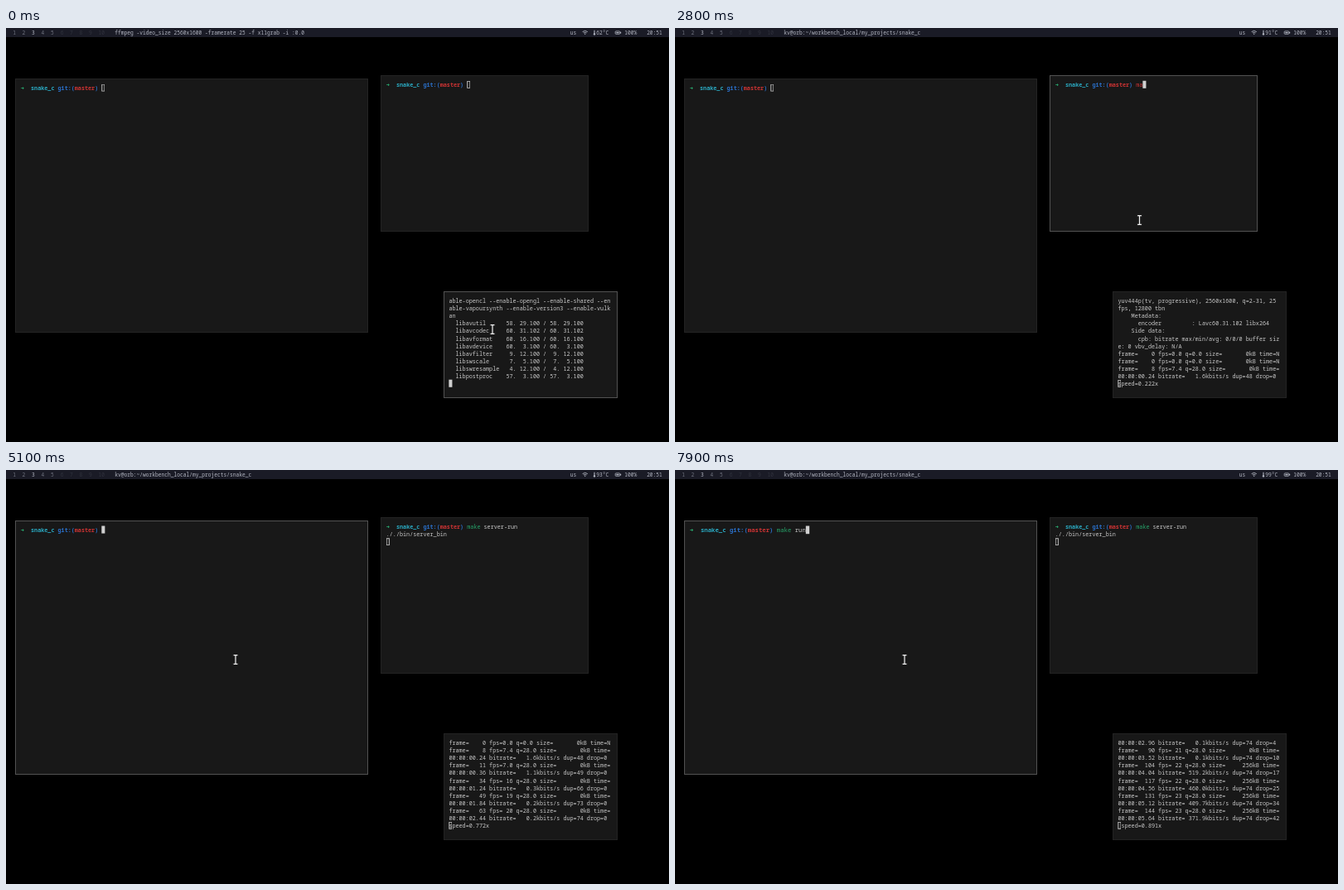
Animation of 800 by 500 pixels, one loop 8000 ms. Source, as an HTML page:

```html
<!DOCTYPE html>
<html lang="en">
<head>
<meta charset="utf-8">
<title>Terminals</title>
<style>
  html, body { margin: 0; width: 100%; height: 100%; overflow: hidden; background: #000; }
  #stage { position: relative; width: 800px; height: 500px; overflow: hidden; background: #000; }
  #bar { position: absolute; width: 800px; height: 11px; background: #1a1b26; }
  .win { position: absolute; box-sizing: border-box; background: #181818; border: 1px solid #232323; }
  .win.on { border-color: #525252; }

  /* Text is laid out on a 2560 x 1600 desktop and shown at 800 x 500. */
  #desk {
    position: absolute; width: 2560px; height: 1600px;
    transform: scale(.3125); transform-origin: 0 0;
    font-family: "Noto Sans Mono", "DejaVu Sans Mono", monospace; color: #c8c8c8;
  }
  #desk pre { position: absolute; margin: 0; font: inherit; font-size: 21.6667px; line-height: 1.34em; }
  #desk .label { position: absolute; top: 0; font-size: 20px; line-height: 35px; color: #b3b6c2; white-space: pre; }
  #desk .label.idle { color: #70737f; }
  #desk .label.empty { color: #30323d; }
  i { display: inline-block; width: .6em; height: 1.34em; vertical-align: top; font-style: normal; }
  .solid { background: #d0d0d0; color: #181818; }
  .hollow { box-shadow: inset 0 0 0 3px #c8c8c8; }
  .green { color: #26a269; }
  .arrow { color: #2bc47e; font-family: "DejaVu Sans Mono", monospace; }
  .cyan { color: #2aa8c0; }
  .blue { color: #2a6fc8; }
  .red { color: #cc3333; }
  .pink { color: #d0405a; }
  .violet { color: #6f68bb; }
  .warn { color: #d6d0ac; }
  svg { position: absolute; left: 0; top: 0; }
</style>
</head>
<body>
<div id="stage">
  <div id="bar"></div>
  <div class="win" id="winLeft" style="left:11px;top:61px;width:426px;height:307px"></div>
  <div class="win" id="winRight" style="left:452px;top:57px;width:251px;height:189px"></div>
  <div class="win" id="winLog" style="left:528px;top:318px;width:210px;height:129px"></div>
  <div id="desk">
    <span class="label" id="title" style="left:420px"></span>
    <span class="label" style="left:2178px">us</span>
    <span class="label" id="temp" style="left:2279px"></span>
    <span class="label" style="left:2388px">100%</span>
    <span class="label" style="left:2474px">20:51</span>
    <pre id="left" style="left:57px;top:216px"></pre>
    <pre id="right" style="left:1468px;top:204px"></pre>
    <pre id="log" style="left:1710px;top:1040px"></pre>
  </div>
  <svg width="800" height="500" fill="none" stroke="#b3b6c2">
    <path d="M695.6 4.6Q698.7 2 701.8 4.6M696.9 6Q698.7 4.5 700.5 6" stroke-width=".9"/>
    <circle cx="698.7" cy="7.3" r=".7" fill="#b3b6c2" stroke="none"/>
    <path d="M710 2.8V7" stroke-width="1.1"/>
    <circle cx="710" cy="7.4" r="1.2" fill="#b3b6c2" stroke="none"/>
    <rect x="735.2" y="3.9" width="5.6" height="3.4" rx=".8" stroke-width=".8"/>
    <path d="M736.4 5.6H739.6M741.6 4.8V6.4" stroke-width="1.2"/>
    <g id="mouse">
      <path id="beam" d="M-2.4-5.3H2.4M0-5.3V5.3M-2.4 5.3H2.4" stroke="#222" stroke-width="2.6" stroke-linecap="square"/>
      <use href="#beam" style="display:none"/>
      <path d="M-2.4-5.3H2.4M0-5.3V5.3M-2.4 5.3H2.4" stroke="#eee" stroke-width="1.2"/>
    </g>
  </svg>
</div>
<script>
const LOOP = 8000, STEP = 100, COLS = 48, ROWS = 12;
const $ = id => document.getElementById(id);
const last = (list, t) => list.filter(e => e[0] <= t).pop();

const SHELL = "kv@orb:~/workbench_local/my_projects/snake_c";
const titles = [
  [0, "ffmpeg -video_size 2560x1600 -framerate 25 -f x11grab -i :0.0"],
  [2400, SHELL], [4000, "make server-run"], [4600, SHELL]
];
const temps = [[0, 62], [700, 63], [1700, 74], [2700, 91], [3700, 92], [4700, 93], [5700, 95], [7700, 99]];
const focus = [[0, "Log"], [2400, "Right"], [4600, "Left"]];
const path = [[0, 587, 364], [1300, 587, 364], [1800, 560.5, 232], [4000, 560.5, 232], [4500, 277, 229], [LOOP, 277, 229]];
const rightTyped = [
  [0, ""], [2700, "m"], [2800, "ma"], [2900, "mak"], [3000, "make"], [3100, "make "],
  [3200, "make r"], [3300, "make ru"], [3400, "make run"], [3700, "make server-run"]
];
const leftTyped = [
  [0, ""], [5300, "m"], [5400, "ma"], [5500, "mak"], [5600, "make"], [5700, "make "],
  [5900, "make r"], [6000, "make ru"], [6200, "make run"]
];
const ENTER = 4000, ZOOM = 7800;

// Each entry takes over from the unfinished last line: [time, text, cursor column].
const idle = `frame=    0 fps=0.0 q=0.0 size=       0kB time=N/A bitrate=N/A dup=38 drop=0 speed=N/A`;
const output = [
  [0, `able-opencl --enable-opengl --enable-shared --enable-vapoursynth --enable-version3 --enable-vulkan
  libavutil      58. 29.100 / 58. 29.100
  libavcodec     60. 31.102 / 60. 31.102
  libavformat    60. 16.100 / 60. 16.100
  libavdevice    60.  3.100 / 60.  3.100
  libavfilter     9. 12.100 /  9. 12.100
  libswscale      7.  5.100 /  7.  5.100
  libswresample   4. 12.100 /  4. 12.100
  libpostproc    57.  3.100 / 57.  3.100
`],
  [1000, `[x11grab @ 0x59b768b765c0] Stream #0: not enough frames to estimate rate; consider increasing probesize
Input #0, x11grab, from ':0.0':
  Duration: N/A, start: 1717955492.213466, bitrate: 3276800 kb/s
  Stream #0:0: Video: rawvideo (BGR[0] / 0x524742), bgr0, 2560x1600, 3276800 kb/s, 25 fps, 1000k tbr, 1000k tbn
File 'screen_capture.mp4' already exists. Overwrite? [y/N] `, 11],
  [1200, `ite? [y/N] y`, 12],
  [1300, `ite? [y/N] y
`],
  [1400, `Stream mapping:
  Stream #0:0 -> #0:0 (rawvideo (native) -> h264 (libx264))
Press [q] to stop, [?] for help
`],
  [1600, `[libx264 @ 0x59b768b8e2c0] using cpu capabilities: MMX2 SSE2Fast SSSE3 SSE4.2 AVX FMA3 BMI2 AVX2
`],
  [1700, `Output #0, mp4, to 'screen_capture.mp4':
  Metadata:
    encoder         : Lavf60.16.100
  Stream #0:0: Video: h264 (avc1 / 0x31637661), yuv444p(tv, progressive), 2560x1600, q=2-31, 25 fps, 12800 tbn
    Metadata:
      encoder         : Lavc60.31.102 libx264
    Side data:
      cpb: bitrate max/min/avg: 0/0/0 buffer size: 0 vbv_delay: N/A
`],
  [1800, idle], [1900, idle]
];

// time, frame, fps, size, seconds, bitrate, dup, drop, speed
const stats = [
  [2500, 8, "7.4", 0, .24, "1.6", 48, 0, ".222"],
  [3000, 11, "7.0", 0, .36, "1.1", 49, 0, ".227"],
  [3700, 34, "16", 0, 1.24, "0.3", 66, 0, ".587"],
  [4200, 49, "19", 0, 1.84, "0.2", 73, 0, ".697"],
  [4700, 63, "20", 0, 2.44, "0.2", 74, 0, ".772"],
  [5200, 77, "21", 0, 2.96, "0.1", 74, 4, ".808"],
  [5800, 90, "21", 0, 3.52, "0.1", 74, 10, ".832"],
  [6300, 104, "22", 256, 4.04, "519.2", 74, 17, ".848"],
  [6800, 117, "22", 256, 4.56, "460.0", 74, 25, ".866"],
  [7300, 131, "23", 256, 5.12, "409.7", 74, 34, ".880"],
  [7800, 144, "23", 256, 5.64, "371.9", 74, 42, ".891"]
];
const pad = (v, n) => String(v).padStart(n);
for (const [t, n, fps, size, sec, rate, dup, drop, speed] of stats)
  output.push([t, `frame=${pad(n, 5)} fps=${pad(fps, 3)} q=28.0 size=${pad(size, 8)}kB time=` +
    `00:00:0${sec.toFixed(2)} bitrate=${pad(rate, 6)}kbits/s dup=${dup} drop=${drop} speed=0${speed}x`]);

const span = (cls, s) => `<span class="${cls}">${s}</span>`;
const caret = (on, ch = "") => `<i class="${on ? "solid" : "hollow"}">${ch}</i>`;
const wrap = line => line.match(new RegExp(`.{1,${COLS}}`, "g")) || [""];
const tint = line => line
  .replace(/^(\[\w+ @ )(\w+)\]/, (_, a, b) => span("pink", a) + span("violet", b) + span("pink", "]"))
  .replace(/not enough$|^ frames to.*|^obesize$/, s => span("warn", s));

function logView(t, on) {
  let lines = [""], col = 0;
  for (const [at, text, c = 0] of output) {
    if (at > t) break;
    lines.pop();
    lines.push(...text.split("\n").flatMap(wrap));
    col = c;
  }
  lines = lines.slice(-ROWS);
  const end = lines.pop();
  return lines.map(tint).join("\n") + "\n" +
    end.slice(0, col) + caret(on, end[col]) + end.slice(col + 1);
}

function prompt(cmd) {
  const [word, ...rest] = cmd.split(" ");
  return `<b class="arrow">➜</b>  <b class="cyan">snake_c</b> <b class="blue">git:(` +
    `<span class="red">master</span>)</b> ` +
    span(word === "make" ? "green" : "red", word) + (rest.length ? " " + rest.join(" ") : "");
}

function mouseAt(t) {
  const i = path.findIndex(p => p[0] > t), [t0, x0, y0] = path[i - 1], [t1, x1, y1] = path[i];
  const u = (t - t0) / (t1 - t0), k = u * u * (3 - 2 * u);
  return [x0 + (x1 - x0) * k, y0 + (y1 - y0) * k];
}

function draw(t) {
  const active = last(focus, t)[1];
  for (const w of ["Left", "Right", "Log"]) $("win" + w).classList.toggle("on", w === active);
  $("title").textContent = last(titles, t)[1];
  $("temp").textContent = last(temps, t)[1] + "°C";
  $("log").innerHTML = logView(t, active === "Log");
  $("right").innerHTML = prompt(last(rightTyped, t)[1]) +
    (t >= ENTER ? "\n././bin/server_bin\n" : "") + caret(active === "Right");
  $("left").innerHTML = prompt(last(leftTyped, t)[1]) + caret(active === "Left");
  $("left").style.fontSize = t >= ZOOM ? "23.3333px" : "";
  $("mouse").setAttribute("transform", `translate(${mouseAt(t)})`);
}

for (let n = 1; n <= 10; n++) {
  const s = document.createElement("span");
  s.className = "label" + (n > 5 ? " empty" : n === 3 ? "" : " idle");
  s.style.left = 26 + (n - 1) * 36.8 + "px";
  s.textContent = n;
  $("desk").append(s);
}

let shown = -1;
const start = performance.now();
function tick() {
  const t = Math.floor((performance.now() - start) % LOOP / STEP) * STEP;
  if (t !== shown) draw(shown = t);
  requestAnimationFrame(tick);
}
tick();
</script>
</body>
</html>
```
